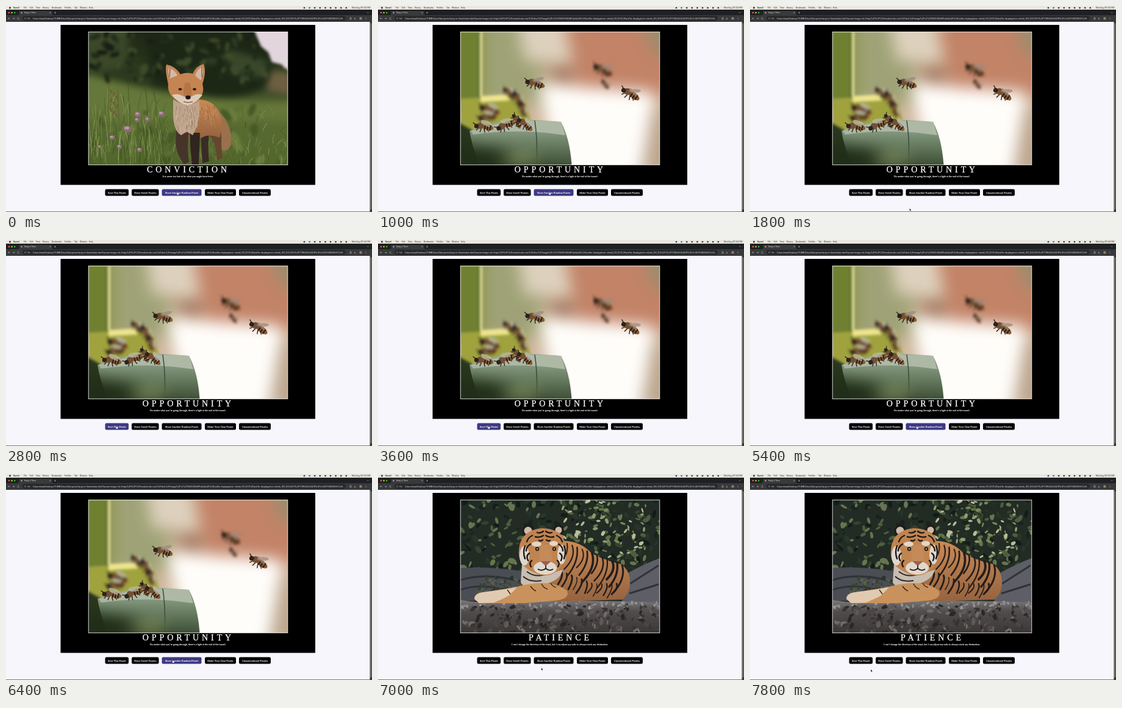
An HTML page that plays this animation: 600x338 px, repeating every 8000 ms.

```html
<!DOCTYPE html>
<html lang="en">
<head>
<meta charset="utf-8">
<title>Hang in There</title>
<style>
  html, body { margin: 0; width: 100%; height: 100%; overflow: hidden; background: #f7f6fd; }
  svg { display: block; width: 100%; height: 100%; }
  text { font-family: Inter, Roboto, sans-serif; font-size: 3.05px; }
  .serif { font-family: "Liberation Serif", "Noto Serif", serif; fill: #fff; stroke: #fff; stroke-width: .1; text-anchor: middle; }
  .title { font-size: 14px; letter-spacing: 4.9px; stroke-width: .25; }
  .quote { font-size: 4.08px; }
  .label { font-size: 4.5px; }
  .soft1 { filter: blur(.6px); }
  .soft2 { filter: blur(2px); }
  .soft3 { filter: blur(6px); }
  .soft4 { filter: blur(13px); }
</style>
</head>
<body>
<svg viewBox="0 0 600 338" preserveAspectRatio="none">
  <defs>
    <clipPath id="photo"><rect x="135" y="42" width="327" height="219"/></clipPath>
    <clipPath id="address"><rect x="43" y="15" width="509" height="11"/></clipPath>
    <linearGradient id="meadow" x2="0" y2="1">
      <stop stop-color="#1f2917"/><stop offset=".4" stop-color="#303d1f"/>
      <stop offset=".58" stop-color="#5a6c33"/><stop offset="1" stop-color="#52662c"/>
    </linearGradient>
    <linearGradient id="fur" x2="0" y2="1">
      <stop stop-color="#c98a55"/><stop offset="1" stop-color="#94623f"/>
    </linearGradient>
    <linearGradient id="board" x2="0" y2="1">
      <stop stop-color="#9fb09a"/><stop offset=".4" stop-color="#71866b"/><stop offset="1" stop-color="#34452c"/>
    </linearGradient>
    <linearGradient id="ledge" x2="0" y2="1">
      <stop stop-color="#7d7a7c"/><stop offset=".3" stop-color="#514d4e"/><stop offset="1" stop-color="#35312f"/>
    </linearGradient>
  </defs>

  <rect width="600" height="338" fill="#f7f6fd"/>
  <g id="browser">
    <rect width="600" height="6" fill="#e9e7df"/>
    <rect y="6" width="600" height="9" fill="#1f2023"/>
    <path d="M20 15Q21.500 14 21.500 12V9.500Q21.500 8 23 8H74Q75.500 8 75.500 9.500V12Q75.500 14 77 15Z" fill="#38393b"/>
    <rect y="15" width="600" height="11" fill="#38393b"/>
    <rect x="27" y="16.300" width="530" height="8" rx="4" fill="#27282b"/>
    <text x="30" y="11.900" fill="#e4e4e6" style="font-size:2.9px">Hang in There</text>
    <text x="35" y="21.500" fill="#ccc">File</text>
    <circle cx="25.500" cy="11" r="1.200" fill="#aaa"/>
    <circle cx="31.500" cy="20.400" r="1.100" fill="none" stroke="#ccc" stroke-width=".4"/>
    <path d="M71.500 10l1.800 1.800m0-1.800l-1.800 1.800M79 11h3m-1.500-1.500v3M6.500 20.500H3.500l1.300-1.300M3.500 20.500l1.300 1.300M11 20.500h3l-1.300-1.300M14 20.500l-1.300 1.300M21.500 19.500a1.500 1.500 0 1 0 .2 1.600M592 10l1.300 1.300 1.300-1.300M564 19h2v3h-2zM572 19v3m-1.200-1l1.200 1.200 1.200-1.200"
      fill="none" stroke="#ccc" stroke-width=".5"/>
    <circle cx="581.500" cy="20.400" r="2.200" fill="#9a7b62"/>
    <path d="M590 19v3.300" stroke="#ccc" stroke-width=".7" stroke-dasharray=".7 .6"/>
    <text x="44" y="21.600" fill="#e8e8ea" style="font-size:3.45px" clip-path="url(#address)">/Users/mira/Desktop/TURING/mod1/projects/hang-in-there/index.html?poster-image-url=https%3A%2F%2Fmedia.licdn.com%2Fdms%2Fimage%2Fv2%2FD4E03AQHPqfnQxQA%2Fprofile-displayphoto-shrink_100_100%2Fprofile-displayphoto-shrink_100_100%2F0%2F1718045024478%3Fe%3D1728518400%26v%3Dbeta%26t%3D</text>
    <text x="552" y="21.600" fill="#e8e8ea">…</text>
    <text x="597" y="4.200" text-anchor="end" fill="#222">Wed Aug 28  1:44 PM</text>
    <circle cx="6.500" cy="3" r="1.400" fill="#222"/>
  </g>
  <rect x="596.500" y="26" width="3.500" height="312" fill="#333437"/>
  <rect x="597.300" y="28" width="1.900" height="306" rx="1" fill="#77787b"/>
  <rect y="337.300" width="600" height=".7" fill="#444"/>

  <rect x="89.500" y="31" width="417.500" height="262.500" fill="#000"/>
  <g clip-path="url(#photo)">
    <g class="photo">
      <rect x="135" y="42" width="327" height="219" fill="url(#meadow)"/>
      <g class="soft3">
        <path d="M125 110Q185 125 245 140Q320 160 475 158V188H125Z" fill="#65773a"/>
        <path d="M225 30H415L445 120Q400 155 340 148L240 130Z" fill="#1c2716"/>
        <path d="M125 30H205L195 100L125 115Z" fill="#3b4829"/>
        <path d="M360 70L430 90L420 118L370 112Z" fill="#39482a"/>
        <path d="M435 105L475 110V148L425 138Z" fill="#6d6040"/>
      </g>
      <g class="soft2" id="hedge"></g>
      <path class="soft2" d="M406 38H470V106Q456 104 452 96L436 92L430 76L418 66Z" fill="#e2d6dc"/>
      <g class="soft1" id="grass"></g>
      <g class="soft1" id="clover"></g>
      <g class="soft1">
        <path d="M348 172Q372 195 369 228Q362 242 353 234Q357 210 343 190Z" fill="#9a714c"/>
        <path d="M334 196L354 192Q351 215 355 250L346 253Q344 225 334 212Z" fill="#65462f"/>
        <path d="M319 208L333 206Q330 235 333 255L322 258Z" fill="#382c25"/>
        <path d="M280 162Q318 146 338 160Q354 172 355 200L350 216Q330 208 318 218L285 216Q270 190 280 160Z" fill="url(#fur)"/>
        <path d="M279 203L300 208Q296 230 300 256L292 260Q280 245 278 225Z" fill="#46342a"/>
        <path d="M301 208L318 208Q317 235 316 260L305 261Q302 235 301 208Z" fill="#30251f"/>
        <path d="M274 153Q296 168 317 156Q319 190 306 212L297 206L287 212Q275 205 274 180Z" fill="#bea48c"/>
        <g id="coat" fill="none"></g>
        <path d="M266 128Q260 104 263 96Q277 98 286 112Q296 108 306 111Q312 98 324 95Q329 108 322 128Q326 141 318 150Q306 162 298 163Q288 162 276 152Q264 142 266 128Z" fill="#c58451"/>
        <path d="M268 119Q265 104 267 101Q277 105 281 114ZM310 114Q314 103 322 99Q325 110 319 122Z" fill="#d3b9a6"/>
        <path d="M268 117l1-15M321 117v-17" stroke="#5a4134"/>
        <path d="M272 146Q282 143 288 147L298 151L307 147Q314 143 322 146Q311 160 298 163Q282 160 272 146Z" fill="#dccbb9"/>
        <path d="M291 136L292 148Q298 152 304 148L304 136L301 126H294Z" fill="#b57547"/>
        <ellipse cx="285.500" cy="136.500" rx="2.800" ry="2" fill="#2b1d16"/><ellipse cx="309" cy="136.500" rx="2.800" ry="2" fill="#2b1d16"/>
        <ellipse cx="298.500" cy="150" rx="4.200" ry="3.200" fill="#1b1515"/>
        <path d="M291 157Q298 160 306 157" stroke="#54392d" fill="none"/>
      </g>
    </g>

    <g class="photo">
      <rect x="135" y="42" width="327" height="219" fill="#d1b69c"/>
      <g class="soft4">
        <path d="M110 20H172V165H110Z" fill="#87913e"/>
        <path d="M172 20H270V160H172Z" fill="#9fa276"/>
        <path d="M228 20H330V90H240Z" fill="#ddd1bd"/>
        <path d="M305 20H490V148H330Z" fill="#c28367"/>
        <path d="M432 20H490V90L450 75Z" fill="#9c8c6d"/>
        <path d="M262 128L450 140L475 285H300Z" fill="#fffdfa"/>
        <path d="M450 165H490V280H430Z" fill="#bca58d"/>
        <path d="M275 110Q300 90 322 108L312 130Z" fill="#976a55"/>
      </g>
      <g class="soft2">
        <path d="M135 42H165V152H135Z" fill="#6f8031"/>
        <path d="M167 42H170.500V148H167Z" fill="#f5f0ac"/>
        <path d="M164.500 42H166.500V152H164.500Z" fill="#4e5924"/>
        <path d="M135 152L240 146L250 188L135 205Z" fill="#a0a23e"/>
        <path d="M168 148L212 145L216 155L168 158Z" fill="#ede58d"/>
        <path d="M130 190L155 204L195 270H130Z" fill="#29371e"/>
      </g>
      <g class="soft1">
        <path d="M150 205Q205 183 258 187L300 190Q316 220 318 270H170Q155 235 150 205Z" fill="url(#board)"/>
        <path d="M152 205Q210 184 300 190L307 212Q230 200 156 211Z" fill="#adb9a5"/>
        <path d="M257 188Q262 222 260 261" stroke="#3c4a37" stroke-width="1.500" fill="none"/>
      </g>
      <g class="soft4"><path d="M125 225L220 240L290 275H125Z" fill="#202d18"/><ellipse cx="235" cy="252" rx="32" ry="9" fill="#8b9b67"/></g>
      <g id="bees"></g>
    </g>

    <g class="photo">
      <rect x="135" y="42" width="327" height="219" fill="#222c25"/>
      <g id="leaves" class="soft1"></g>
      <g class="soft1">
        <path d="M130 155Q175 150 240 160V208H130Z" fill="#4b4d55"/>
        <path d="M405 165Q438 146 470 135V212H400Z" fill="#5d5e66"/>
        <path d="M135 174Q180 160 238 178M135 190Q170 178 215 192M413 180L460 150M412 196L460 181" stroke="#303237" stroke-width="3" fill="none"/>
      </g>
      <g id="undergrowth" class="soft1"></g>
      <path d="M130 206Q190 216 250 209Q360 206 470 211V270H130Z" fill="url(#ledge)"/>
      <g id="stone" class="soft1"></g>
      <g class="soft1">
        <path d="M298 110Q330 108 350 130Q372 142 398 148Q414 158 413 180Q412 198 400 206L300 209Q262 206 246 212L238 182Q262 150 298 110Z" fill="url(#fur)"/>
        <g id="stripes" fill="none" stroke="#251d1a" stroke-linecap="round"></g>
        <path d="M236 148Q262 172 303 157Q298 178 262 183Q240 190 234 178Z" fill="#c9bdb0"/>
        <path d="M238 168q10 10 30 7m-24-15q12 10 30 5" stroke="#2e2622" stroke-width="2" fill="none"/>
        <path d="M159 206Q156 197 172 194Q215 188 245 181Q290 174 310 192Q315 205 290 208L240 212L166 212Z" fill="#c9925c"/>
        <path d="M158 205Q158 196 172 194Q205 190 228 186L214 200Q200 207 190 211L166 212Z" fill="#e0cbb2"/>
        <path d="M250 184q4 6 9 8m9-12q3 7 10 9m5-10q3 6 9 7M212 190l5 7" stroke="#3a291f" stroke-width="1.500" fill="none"/>
        <g fill="#cdbcaa" stroke="#211b18" stroke-width="3"><circle cx="246" cy="93" r="8"/><circle cx="296" cy="92" r="7"/></g>
        <path d="M231 125Q228 150 258 163Q274 170 288 163Q309 150 308 124Q306 102 296 96Q270 82 246 96Q232 106 231 125Z" fill="#c18450"/>
        <g fill="#e0d8cd">
          <ellipse cx="240" cy="134" rx="8" ry="16"/><ellipse cx="301" cy="132" rx="7" ry="16"/>
          <ellipse cx="260" cy="115" rx="8" ry="4"/><ellipse cx="288" cy="114" rx="7" ry="4"/>
          <ellipse cx="274" cy="154" rx="19" ry="11"/>
        </g>
        <path d="M267 116H282L286 144H264Z" fill="#c48a5a"/>
        <path d="M266 143H284L275 151Z" fill="#9b6055"/>
        <path d="M275 150v5q-6 5-13 1m13-1q6 5 12 1" stroke="#171413" stroke-width="1.700" fill="none"/>
        <g fill="#b7a964" stroke="#171413" stroke-width="1.700"><circle cx="261" cy="123" r="2.300"/><circle cx="289" cy="123" r="2.300"/></g>
        <g id="faceMarks" fill="none" stroke="#1e1917" stroke-width="2.400" stroke-linecap="round"></g>
      </g>
    </g>
  </g>
  <rect x="135.200" y="42.700" width="326.600" height="218" fill="none" stroke="#e6e6e6" stroke-width=".9"/>
  <text id="title" class="serif title" x="299" y="273"></text>
  <text id="quote" class="serif quote" x="298.200" y="281.300"></text>
  <g id="buttons"></g>
  <g id="pointer">
    <path id="arrow" d="M0 0V4L1 3.200L1.700 4.700L2.400 4.400L1.700 3H3Z" fill="#000" stroke="#fff" stroke-width=".3"/>
    <path id="hand" d="M-.4 0Q0-.5.400 0V1.600L2.300 2.100Q2.700 2.300 2.500 3.500L2 4.900H-.2L-1.500 2.900Q-1.400 2.300-.4 2.900Z" fill="#fff" stroke="#111" stroke-width=".35"/>
  </g>
</svg>
<script>
const $ = id => document.getElementById(id);
const add = (id, markup) => $(id).insertAdjacentHTML('beforeend', markup);

let seed = 7;
const random = () => (seed = seed * 16807 % 2147483647) / 2147483647;
const between = (a, b) => a + (b - a) * random();
const pick = list => list[Math.floor(random() * list.length)];
const ellipse = (x, y, rx, ry, fill, angle = 0) =>
  `<ellipse rx="${rx}" ry="${ry}" fill="${fill}" transform="translate(${x} ${y}) rotate(${angle})"/>`;

function scatter(id, count, [left, top, right, bottom], size, colors) {
  let markup = '';
  for (let i = 0; i < count; i++) {
    const r = between(size * .4, size);
    markup += ellipse(between(left, right), between(top, bottom), r, r * between(.3, .7), pick(colors), between(0, 180));
  }
  add(id, markup);
}

// Browser bar details
const menu = { File: 29, Edit: 39, View: 49, History: 60, Bookmarks: 75, Profiles: 96, Tab: 112, Window: 121, Help: 136 };
add('browser', '<text x="12" y="4.200" font-weight="700" fill="#222">Sorvel</text>');
for (const name in menu) add('browser', `<text x="${menu[name]}" y="4.200" fill="#222">${name}</text>`);
['#ff5f57', '#febc2e', '#28c840'].forEach((color, i) => add('browser', ellipse(5 + i * 4.6, 11, 1.3, 1.3, color)));
for (let i = 0; i < 9; i++) add('browser', ellipse(489 + i * 8.6, 3, 1.4, 1.3, i == 1 ? '#3567d8' : '#33343a'));

// Fox meadow
scatter('hedge', 100, [135, 42, 430, 125], 10, ['#172013', '#2b3a22', '#3d4a29', '#212d19']);
scatter('hedge', 50, [135, 165, 462, 261], 13, ['#6b7d3d', '#455a27', '#5d7133']);
for (let i = 0; i < 260; i++) {
  const x = between(135, i % 3 ? 462 : 270), y = between(i % 2 ? 175 : 225, 265), h = between(8, x < 260 ? 60 : 16);
  add('grass', `<path d="M${x} ${y}q${between(-3, 3)} ${-h / 2} ${between(-9, 9)} ${-h}" fill="none" opacity=".6"
    stroke="${pick(['#869a50', '#33471f', '#9aa85f', '#465d29'])}" stroke-width="${between(.4, 1.3)}"/>`);
}
for (const [x, y, r] of [[199, 202, 6.5], [216, 178, 5], [215, 187, 4], [174, 216, 4.5], [232, 186, 4], [255, 177, 5], [186, 231, 4], [219, 236, 4], [154, 231, 3]]) {
  add('clover', `<path d="M${x} ${y}q2 15 0 35" stroke="#465f2b" fill="none"/>` +
    ellipse(x, y, r, r * .85, '#8d6c73') + ellipse(x - 1, y - r * .3, r * .6, r * .4, '#b797a9'));
}
for (let i = 0; i < 9; i++) add('clover', ellipse(172 + i % 3 * 5, 140 + i * 5, 1.5, 4, '#735a38', i % 2 ? 30 : -30));
for (let i = 0; i < 120; i++) {
  const x = between(277, 345), chest = x < 316;
  add('coat', `<path d="M${x} ${between(162, chest ? 200 : 190)}q1 4 ${between(-2, 3)} ${between(5, 10)}" opacity=".55"
    stroke="${pick(chest ? ['#7d614d', '#e0cdb9', '#a68264'] : ['#8a5a37', '#d19c6c'])}"/>`);
}

// Bees, seen from the side with the head to the left
function bee(x, y, scale, angle, blur, flying) {
  const wing = flying ? '#9c8a7d' : '#b8b7a4';
  add('bees', `<g class="soft${blur}"><g transform="translate(${x} ${y}) rotate(${angle}) scale(${scale})">
    <path d="M-7 3l-4 5M-3 4l-2 6M1 4l2 6M5 3l4 5M-12-1l-5-3" stroke="#2d2118" stroke-width="1.300"/>
    ${ellipse(6, 1, 10, 4.5, '#8a5930', 10)}
    <path d="M3-3l-1 8M7-3l-1 9M11-2l-1 8" stroke="#2a1d17" stroke-width="2"/>
    ${ellipse(-5, 0, 5.5, 5, '#725033')}${ellipse(-11, 1, 3.5, 3.5, '#2c221d')}
    <g opacity=".75">${ellipse(4, -6, 9, 2.8, wing, flying ? -28 : 14)}${ellipse(3, -3, 8, 2, wing, 22)}</g></g></g>`);
}
bee(183, 169, 1.15, 15, 2);
bee(179, 181, 1.05, -10, 2);
bee(216, 142, .85, 35, 2);
bee(231, 153, 1.05, 55, 2);
bee(238, 169, .85, 70, 2);
bee(173, 197, 1.05, 5, 1);
bee(208, 195, 1.05, -24, 1);
bee(228, 188, .85, 60, 1);
bee(241, 193, 1, 35, 1);
bee(257, 126, 1.08, 12, 1, true);
bee(369, 104, 1.15, 25, 2, true);
bee(373, 128, .6, 50, 2, true);
bee(414, 143, 1.1, 28, 1, true);

// Tiger on the ledge
scatter('leaves', 260, [135, 42, 462, 160], 7, ['#34432f', '#4d5d3d', '#141c18', '#66754f', '#28352a', '#19231e']);
scatter('leaves', 130, [300, 42, 440, 145], 5, ['#8f9c70', '#b9be98', '#5f7045', '#283526', '#77875a']);
scatter('undergrowth', 60, [165, 168, 237, 194], 4, ['#38462d', '#586642', '#29342a']);
scatter('stone', 200, [135, 216, 462, 261], 6, ['#2a2726', '#5f5a58', '#4b4645', '#383433', '#716b69']);
scatter('stone', 70, [135, 210, 462, 219], 4, ['#8d8a8c', '#6c686a', '#9c9796']);
for (let i = 0; i < 12; i++) {
  const x = 310 + i * 8.2, y = 114 + i * 3.2, drop = Math.min(30 + i % 3 * 9, 200 - y);
  add('stripes', `<path d="M${x} ${y}q${i % 2 ? 7 : 3} ${drop / 2} ${-9 - i % 3 * 4} ${drop}" stroke-width="${between(2, 3.8)}"/>` +
    `<path d="M${x - 9} ${Math.min(y + 46, 180)}q3 7 ${between(-9, -3)} ${between(14, 24)}" stroke-width="${between(1.5, 3)}"/>`);
}
for (const side of [-1, 1]) {
  add('faceMarks', `<g transform="translate(273 0) scale(${side} 1)">
    <path d="M2 94q5 4 10 2M2 101q6 4 13 2M3 108q3 3 6 1M20 101q7 3 9 10M23 115q7 4 7 11M25 130q6 4 2 12M21 142q5 4 1 10M32 118q4 10 0 21"/></g>`);
}

const photos = [...document.querySelectorAll('.photo')];
const posters = [
  ['CONVICTION', 'It is never too late to be what you might have been.'],
  ['OPPORTUNITY', 'No matter what you’re going through, there’s a light at the end of the tunnel.'],
  ['PATIENCE', 'I can’t change the direction of the wind, but I can adjust my sails to always reach my destination.']
];
const buttons = [
  ['Save This Poster', 162.5, 38.5], ['Show Saved Posters', 206, 44.5], ['Show Another Random Poster', 255.5, 65],
  ['Make Your Own Poster', 326, 51], ['Unmotivational Posters', 382, 52]
];
for (const [label, x, width] of buttons) {
  add('buttons', `<rect x="${x}" y="300.500" width="${width}" height="11" rx="2.200"/>
    <text class="serif label" x="${x + width / 2}" y="307.600">${label}</text>`);
}
const buttonRects = [...$('buttons').querySelectorAll('rect')];

const LOOP = 8000;
// time, x, y of the pointer tip
const path = [
  [0, 281, 305], [1200, 281, 305], [1600, 261.5, 332], [1950, 261.5, 332], [2400, 181, 305], [3600, 181, 305],
  [4100, 237, 332.5], [4450, 237, 332.5], [5000, 273.5, 305], [6800, 273.5, 305], [7200, 262, 331], [7400, 255, 332], [7800, 198, 320.5], [LOOP, 198, 320.5]
];

function pointerAt(time) {
  const next = path.findIndex(point => point[0] > time);
  const [t0, x0, y0] = path[next - 1], [t1, x1, y1] = path[next];
  const u = (time - t0) / (t1 - t0), eased = u * u * (3 - 2 * u);
  return [x0 + (x1 - x0) * eased, y0 + (y1 - y0) * eased];
}

function draw() {
  const time = performance.now() % LOOP;
  const current = time < 800 ? 0 : time < 6700 ? 1 : 2;
  photos.forEach((photo, i) => photo.style.display = i == current ? '' : 'none');
  [$('title').textContent, $('quote').textContent] = posters[current];

  const [x, y] = pointerAt(time);
  const hovered = buttons.findIndex(([, left, width]) => x >= left && x <= left + width && y >= 300.5 && y <= 311.5);
  buttonRects.forEach((rect, i) => rect.setAttribute('fill', i == hovered ? '#3d3984' : '#000'));
  $('pointer').setAttribute('transform', `translate(${x} ${y})`);
  $('arrow').style.display = hovered < 0 ? '' : 'none';
  $('hand').style.display = hovered < 0 ? 'none' : '';
  requestAnimationFrame(draw);
}
draw();
</script>
</body>
</html>
```
